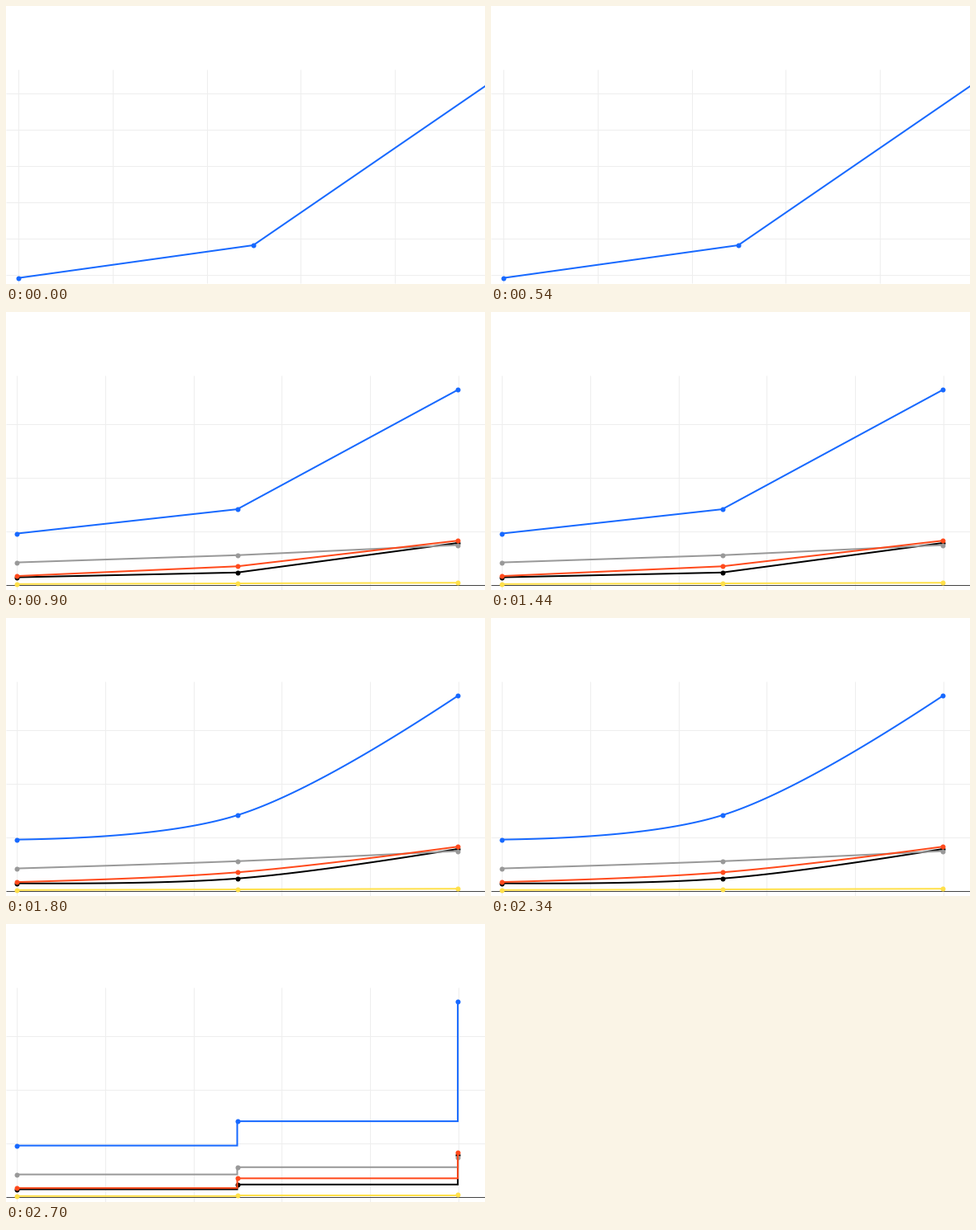
Animation of 579x337 px, one loop 3.6 s. Source, as a matplotlib script:

```python
import numpy as np
import matplotlib.pyplot as plt
from matplotlib.animation import ArtistAnimation

W, H, DPI = 579, 337, 100
PX = 72 / DPI  # points per pixel
TOP = 77
BLUE, GRID = "#1769ff", "#eeeeee"

fig = plt.figure(figsize=(W / DPI, H / DPI), dpi=DPI, facecolor="white")
ax = fig.add_axes([0, 0, 1, 1])
ax.set_xlim(0, W)
ax.set_ylim(H, 0)
ax.axis("off")

XS = [12.9, 279.5, 546.1]
SERIES = [
    ("#000000", [321.6, 315.8, 280.0]),
    ("#999999", [303.6, 294.8, 282.5]),
    ("#ff4a1c", [320.1, 308.3, 277.2]),
    (BLUE, [268.6, 239.1, 94.4]),
    ("#ffe04a", [329.8, 329.0, 328.2]),
]


def straight(pts):
    return pts


def steps(pts):
    path = [pts[0]]
    for a, b in zip(pts, pts[1:]):
        path += [(b[0], a[1]), b]
    return np.array(path)


def quad(a, c, b, n=60):
    t = np.linspace(0, 1, n)[:, None]
    return (1 - t) ** 2 * a + 2 * t * (1 - t) * c + t ** 2 * b


def spline(pts):
    """Centripetal Catmull-Rom tangents at the middle point, two quadratics."""
    a, m, b = pts
    d1, d2 = a - m, b - m
    r1, r2 = np.sqrt(np.hypot(*d1)), np.sqrt(np.hypot(*d2))
    num = r2 ** 2 * d1 - r1 ** 2 * d2
    before = m + num / (3 * r2 * (r1 + r2))
    after = m - num / (3 * r1 * (r1 + r2))
    return np.vstack([quad(a, before, m), quad(m, after, b)[1:]])


def rule(xs, ys, color):
    return ax.plot(xs, ys, color=color, lw=PX, solid_capstyle="butt", zorder=1)


def grid(xs, ys, bottom):
    art = []
    for x in xs:
        art += rule([x + 0.5] * 2, [TOP, bottom], GRID)
    for y in ys:
        art += rule([0, W], [y + 0.5] * 2, GRID)
    return art


def trace(xs, ys, color, shape):
    pts = np.column_stack([xs, ys])
    path = shape(pts)
    return (ax.plot(path[:, 0], path[:, 1], color=color, lw=2 * PX,
                    solid_capstyle="butt", solid_joinstyle="miter", snap=False)
            + ax.plot(xs, ys, "o", color=color, ms=6 * PX, mew=0, snap=False))


def zoomed():
    return (grid([14, 128, 242, 355, 469], range(105, 326, 44), 336)
            + trace([14.9, 298.9, 582.9], [329.7, 290, 94.6], BLUE, straight))


def chart(shape):
    art = grid([12, 119, 226, 332, 439, 546], [135, 200, 265], H)
    art += rule([0, W], [330.5] * 2, "#444444")
    for color, ys in SERIES:
        art += trace(XS, ys, color, shape)
    return art


scenes = [zoomed()] + [chart(shape) for shape in (straight, spline, steps)]
anim = ArtistAnimation(fig, scenes, interval=900, repeat=True, repeat_delay=0)
plt.show()
```
